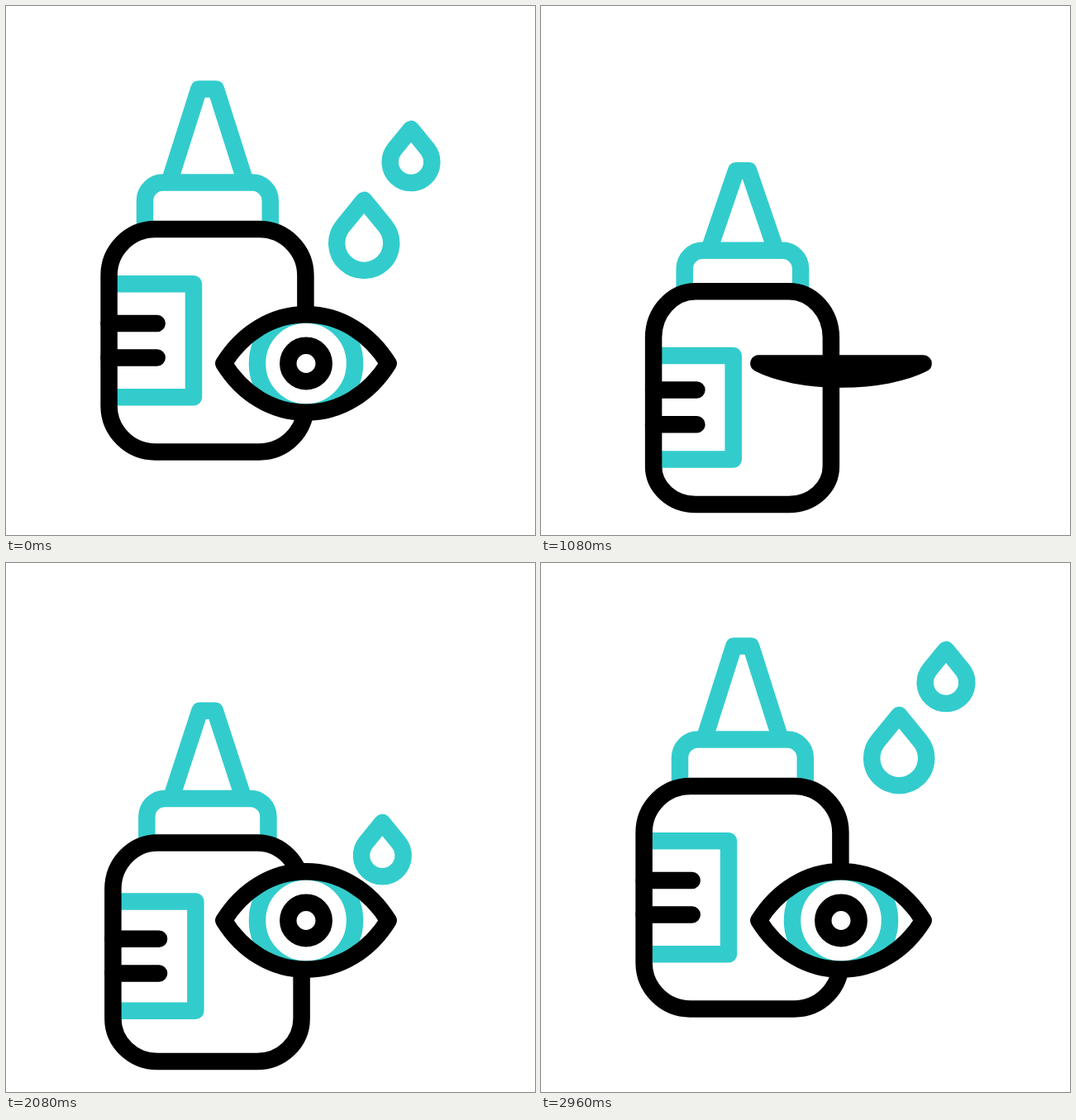
These frames come from a looping animation (640x640 px, 3 s). An HTML page:

```html
<!DOCTYPE html>
<html lang="en">
<head>
<meta charset="utf-8">
<title>Eye drops</title>
<style>
  html, body { margin: 0; width: 100%; height: 100%; overflow: hidden; background: #fff; }
  svg { display: block; width: 100vw; height: 100vh; }
  .line { fill: none; stroke-width: 20.5; stroke-linejoin: round; }
  .teal { stroke: #33cccc; }
  .black { stroke: #000; }
  .round { stroke-linecap: round; }
</style>
</head>
<body>
<svg viewBox="0 0 640 640">
  <defs>
    <clipPath id="eyeClip"><path id="eyeMask"/></clipPath>
    <clipPath id="aboveEye"><rect width="640" height="432"/></clipPath>
  </defs>
  <g class="line teal">
    <path id="jet"/>
    <path id="nozzle"/>
    <path id="neck"/>
    <path id="label"/>
  </g>
  <g class="line black">
    <path id="bottle"/>
    <path id="rows" class="round"/>
  </g>
  <g class="line teal">
    <g clip-path="url(#aboveEye)"><path id="bigDrop"/><path id="followDrop"/></g>
    <path id="smallDrop"/>
    <path id="splash" class="round"/>
  </g>
  <path id="eyeFill" fill="#fff"/>
  <g clip-path="url(#eyeClip)">
    <g id="iris" class="line">
      <circle class="teal" cx="363" cy="432.5" r="59"/>
      <circle class="black" cx="363" cy="432.5" r="21.7"/>
    </g>
  </g>
  <path id="eye" class="line black"/>
</svg>
<script>
const LOOP = 3000, STEP = 40, CYCLE = 1200;
const el = id => document.getElementById(id);
const draw = (id, d) => el(id).setAttribute('d', d);
const clamp = v => Math.max(0, Math.min(1, v));
const ramp = (t, a, b) => clamp((t - a) / (b - a));

// Smooth monotone curve through [time, value] keys
function track(t, keys) {
  const last = keys.length - 1;
  if (t <= keys[0][0]) return keys[0][1];
  if (t >= keys[last][0]) return keys[last][1];
  const slope = i => (keys[i + 1][1] - keys[i][1]) / (keys[i + 1][0] - keys[i][0]);
  const tangent = i => {
    if (i === 0 || i === last) return 0;
    const a = slope(i - 1), b = slope(i);
    return a * b > 0 ? 2 * a * b / (a + b) : 0;
  };
  let i = 0;
  while (t > keys[i + 1][0]) i++;
  const h = keys[i + 1][0] - keys[i][0], u = (t - keys[i][0]) / h, v = 1 - u;
  return keys[i][1] * (1 + 2 * u) * v * v + keys[i + 1][1] * u * u * (3 - 2 * u)
    + h * u * v * (tangent(i) * v - tangent(i + 1) * u);
}

const LOWER = [[210, 0], [280, 2.5], [560, 41], [680, 63], [720, 63.7], [2410, 63.7], [2880, 0]];
const SQUEEZE = [[720, 0], [1080, 1], [1120, 1], [1240, 0]];
const GAZE = [[200, 0], [280, 5], [680, 49.3], [720, 50], [1120, 50], [1440, -30], [1520, -30], [1760, 0]];
const UPPER_LID = [[840, 1], [1080, 0], [1120, 0], [1280, 1]];
const LOWER_LID = [[840, 1], [1080, .32], [1120, .32], [1280, 1]];

// Each ray: start, end, time its tail arrives
const RAYS = [
  [385, 350, 366.5, 280, 2496],
  [415, 350, 427, 294.5, 2444],
  [440, 355, 494.5, 300, 2400]
];

function drop(x, y, r, reach = 1.58, dir = -1) {
  if (r <= 0) return '';
  const c = 1 / reach, dx = r * Math.sqrt(1 - c * c), dy = dir * r * c;
  return `M${x} ${y + dir * r * reach}L${x + dx} ${y + dy}` +
    `A${r} ${r} 0 1 ${dir < 0 ? 1 : 0} ${x - dx} ${y + dy}Z`;
}

function drawBottle(t) {
  const dy = track(t, LOWER);
  const q = track(t, SQUEEZE) + track(t - CYCLE, SQUEEZE);
  const l = 124.6 + 11.5 * q, r = 362.4 - 11.5 * q;
  const top = 270 + dy + 11.5 * q, bottom = 539.4 + dy;
  const rx = 56 - 5 * q, ry = 56 - 10 * q;
  draw('bottle', `M${l + rx} ${top}H${r - rx}A${rx} 56 0 0 1 ${r} ${top + 56}V${bottom - ry}` +
    `A${rx} ${ry} 0 0 1 ${r - rx} ${bottom}H${l + rx}A${rx} ${ry} 0 0 1 ${l} ${bottom - ry}` +
    `V${top + 56}A${rx} 56 0 0 1 ${l + rx} ${top}Z`);

  const nl = 168 + 5.7 * q, nr = 319.8 - 5.7 * q, nt = 213.5 + dy + 18.5 * q;
  draw('neck', `M${nl} ${top}V${nt + 22}a22 22 0 0 1 22 -22H${nr - 22}a22 22 0 0 1 22 22V${top}`);

  const tip = 100.5 + dy + 35 * q, in1 = 5.7 * q, in2 = 2.8 * q;
  draw('nozzle', `M${197.4 + in1} ${nt}L${233.3 + in2} ${tip}H${254 - in2}L${289.9 - in1} ${nt}`);

  draw('label', `M${l} ${336.3 + dy + 23 * q}H${227 + in1}V${473.2 + dy + 11.7 * q}H${l}`);
  draw('rows', [383.9, 425.6].map(y => `M${l} ${y + dy + 17 * q}H${182.7 + in1}`).join(''));
}

function drawDrops(t) {
  // The squeezed-out drop swells as it leaves the tip
  const local = t < 1800 ? t + CYCLE : t, age = local - 2320;
  draw('jet', age > 0 && age < 320
    ? drop(243.8, 164 - age * .904, 33 * clamp(age / 128.6), 1.75, 1) : '');

  const late = t > 2600, k = (late ? t - LOOP : t) / STEP;
  const n = (t - 1720) / STEP;
  let big = '', follow = '', small = '';
  if (late || t < 520) {
    big = drop(433.2, 287 + 51.5 * k + .7 * k * k, 33);
    small = drop(490, 188.8 + 44.3 * k + .3 * k * k, 25.3);
  } else if (t > 1480 && t < 2200) {
    big = drop(405, 165.5 + 50 * n, 33);
    follow = drop(455.3, -60 + 46 * n, 25.3);
  }
  draw('bigDrop', big);
  draw('followDrop', follow);
  draw('smallDrop', small);

  draw('splash', RAYS.map(([x1, y1, x2, y2, end]) => {
    const head = ramp(t, 2080, 2280), tail = ramp(t, 2240, end);
    if (head === 0 || tail === 1) return '';
    const at = u => `${x1 + (x2 - x1) * u} ${y1 + (y2 - y1) * u}`;
    return `M${at(tail)}L${at(head)}`;
  }).join(''));
}

function drawEye(t) {
  const up = track(t, UPPER_LID), low = track(t, LOWER_LID), mid = 432.5;
  const ya = mid - 36.5 * up, yb = mid - 59.2 * up;
  const yc = mid + 36.5 * low, yd = mid + 59.2 * low;
  const d = `M263.4 ${mid}C286 ${ya} 322 ${yb} 363 ${yb}S440 ${ya} 462.6 ${mid}` +
    `C440 ${yc} 404 ${yd} 363 ${yd}S286 ${yc} 263.4 ${mid}Z`;
  ['eye', 'eyeFill', 'eyeMask'].forEach(id => draw(id, d));
  el('iris').setAttribute('transform', `translate(0 ${track(t, GAZE)})`);
}

const start = performance.now();
function frame() {
  const t = Math.floor((performance.now() - start) % LOOP / STEP) * STEP;
  drawBottle(t);
  drawDrops(t);
  drawEye(t);
  requestAnimationFrame(frame);
}
frame();
</script>
</body>
</html>
```
